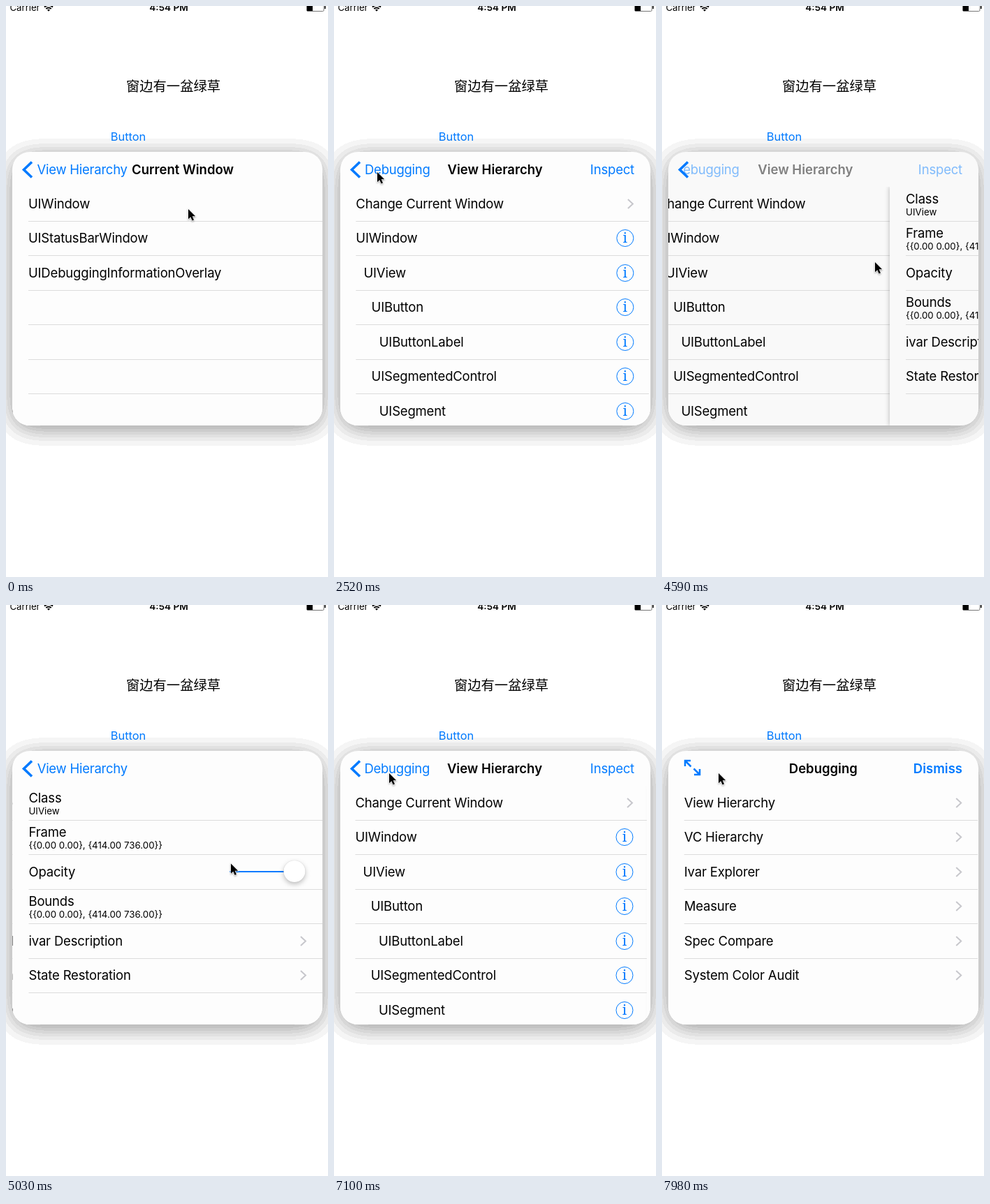
An HTML page for the animation above (8000 ms loop, 461x818 px).

```html
<!DOCTYPE html>
<html lang="en">
<head>
<meta charset="utf-8">
<title>Debug overlay</title>
<style>
  html, body { margin: 0; width: 100%; height: 100%; overflow: hidden; background: #fff; }
  body { position: relative; color: #000; font: 18.5px Inter, sans-serif; letter-spacing: -.18px; white-space: nowrap; }
  div, span, svg { position: absolute; }
  svg { overflow: visible; fill: none; stroke: #007aff; left: 0; top: 0; }
  .mid { transform: translate(-50%, -50%); line-height: 1; letter-spacing: 0; }
  .blue { color: #007aff; }
  #panel { left: 9px; top: 209px; width: 444px; height: 392px; }
  #shadow { inset: 5px 0 -5px; border-radius: 25px; background: #000; filter: url(#bands); }
  #view { inset: 0; border-radius: 25px; overflow: hidden; }
  .body { left: 0; top: 50px; width: 444px; height: 342px; background: inherit; clip-path: inset(0 0 0 -10px); }
  .nav { inset: 0 0 auto 0; height: 50px; line-height: 50px; }
  .clip { left: 22px; top: 0; width: 420px; height: 50px; overflow: hidden; }
  .back { left: 13.5px; letter-spacing: -.25px; }
  .title, b { font-weight: 600; letter-spacing: 0; }
  .right { right: 23px; }
  .row { left: 23px; right: 0; height: 49px; line-height: 49px; border-bottom: 1px solid #dcdcdc; }
  .row.last { border-color: transparent; }
  .row .head { top: -7.5px; }
  .row .sub { top: 12px; font-size: 13.3px; letter-spacing: 0; }
  .info { left: 373px; top: 12px; width: 25px; height: 25px; box-sizing: border-box; border: 1.3px solid #007aff;
    border-radius: 50%; color: #007aff; font: 500 20px/21px "Noto Serif", serif; text-align: center; letter-spacing: 0; }
  .track { left: 288px; top: 23px; width: 92px; height: 2px; background: #007aff; }
  .knob { left: 365px; top: 8px; width: 31px; height: 31px; border-radius: 50%; background: #fff;
    box-shadow: 0 3px 7px rgba(0,0,0,.25), 0 0 1px rgba(0,0,0,.2); }
</style>
</head>
<body>
  <svg width="0" height="0">
    <filter id="bands" x="-20%" y="-20%" width="140%" height="140%">
      <feGaussianBlur stdDeviation="18"/>
      <feComponentTransfer>
        <feFuncA type="discrete" tableValues="0 .04 .08 .12 .16 .2 .24 .28 .32 .36 .4 .44"/>
      </feComponentTransfer>
    </filter>
  </svg>

  <span class="mid" style="left:27px;top:3px;font-size:13.2px">Carrier</span>
  <span class="mid" style="left:233px;top:3px;font-size:13.6px;font-weight:600">4:54 PM</span>
  <svg width="461" height="20" style="stroke:#000">
    <path stroke-width="1.9" d="M55 1.5a8.5 8.5 0 0 1 12 0M57.3 4a5.2 5.2 0 0 1 7.4 0"/>
    <path d="M59 5.6a3 3 0 0 1 4 0l-2 2.2z" fill="#000" stroke="none"/>
    <rect x="430.5" y="-4.5" width="24.5" height="12" rx="1.5" stroke="#777"/>
    <path d="M431 -4h8v11h-8zM456 0h1.5v4h-1.5z" fill="#000" stroke="none"/>
  </svg>
  <span class="mid" style="left:239.5px;top:115px;font:19.3px/1 'Noto Sans CJK SC','Noto Sans CJK',sans-serif">窗边有一盆绿草</span>
  <span class="mid blue" style="left:175px;top:187px;font-size:16.4px">Button</span>

  <div id="panel">
    <div id="shadow"></div>
    <div id="view">
      <svg id="chevron" width="50" height="50"><path stroke-width="3.6" d="M28 14.5L16.5 25.5L28 36.5"/></svg>
    </div>
  </div>
  <svg id="cursor" width="16" height="22" style="filter:drop-shadow(0 1px 1px rgba(0,0,0,.35))">
    <path d="M0 0V14.2L3.3 11.2L5.6 16.6L8 15.6L5.7 10.3H10.2Z" fill="#000" stroke="#fff" stroke-width="1.2" paint-order="stroke"/>
  </svg>

<script>
const $ = id => document.getElementById(id);
const view = $('view'), chevron = $('chevron'), cursor = $('cursor');

const icon = (d, color, width) =>
  `<svg width="9" height="9"><path d="${d}" style="stroke:${color}" stroke-width="${width}"/></svg>`;
const arrow = icon('M389.5 18L396.5 24.5L389.5 31', '#c7c7cc', 2);
const info = '<span class="info">i</span>';
const check = icon('M382.5 24.5L387 29L396 19', '#007aff', 2.5);
const slider = '<div class="track"></div><div class="knob"></div>';
const expand = icon('M24 22V14H32M24 14L32.5 22.5M45 26V34H37M45 34L36.5 25.5', '#007aff', 2.5);

const text = (label, indent = 0) => `<span style="left:${indent * 11.15}px">${label}</span>`;
const detail = (label, sub) => `<span class="head">${label}</span><span class="sub">${sub}</span>`;
const rect = '{{0.00 0.00}, {414.00 736.00}}';

function makePage({ back = '', title = '', center = 222, right = '', rows, extra = '', openEnd }) {
  const body = document.createElement('div'), nav = document.createElement('div');
  body.className = 'body';
  body.innerHTML = rows.map((row, i) => {
    const last = openEnd && i === rows.length - 1 ? ' last' : '';
    return `<div class="row${last}" style="top:${Math.floor(i * 49.5)}px">${row}</div>`;
  }).join('');
  nav.className = 'nav';
  nav.innerHTML = `${extra}<div class="clip"><span class="back blue">${back}</span></div>
    <span class="title" style="left:${center}px">${title}</span><span class="right blue">${right}</span>`;
  view.append(body);
  return { body, nav, back: nav.querySelector('.back'), title: nav.querySelector('.title'),
    right: nav.querySelector('.right'), extra: nav.querySelector('svg') };
}

const menu = makePage({
  title: 'Debugging', right: '<b>Dismiss</b>', extra: expand, openEnd: true,
  rows: ['View Hierarchy', 'VC Hierarchy', 'Ivar Explorer', 'Measure', 'Spec Compare', 'System Color Audit']
    .map(label => text(label) + arrow)
});
const tree = makePage({
  back: 'Debugging', title: 'View Hierarchy', right: 'Inspect',
  rows: [text('Change Current Window') + arrow,
    ...[['UIWindow', 0], ['UIView', 1], ['UIButton', 2], ['UIButtonLabel', 3], ['UISegmentedControl', 2], ['UISegment', 3]]
      .map(([label, indent]) => text(label, indent) + info)]
});
const windows = makePage({
  back: 'View Hierarchy', title: 'Current Window', center: 244,
  rows: [text('UIWindow') + `<span id="check">${check}</span>`, text('UIStatusBarWindow'),
    text('UIDebuggingInformationOverlay'), '', '', '']
});
const object = makePage({
  back: 'View Hierarchy',
  rows: [detail('Class', 'UIView'), detail('Frame', rect), text('Opacity') + slider, detail('Bounds', rect),
    text('ivar Description') + arrow, text('State Restoration') + arrow]
});
const pages = [menu, tree, windows, object];
view.append(...pages.map(page => page.nav), chevron);

const LOOP = 8000, STEP = 148;
const moves = [
  { start: 2110, parent: tree, child: windows },
  { start: 4530, parent: tree, child: object, push: true },
  { start: 6750, parent: tree, child: object },
  { start: 7530, parent: menu, child: tree }
];
const presses = [[2040, 2110], [6600, 6750], [7390, 7530]];

// Pointer path: step, x, y
const path = [
  [0, 261, 291], [1, 258, 292], [2, 257, 293], [6, 257, 292], [8, 225, 287], [10, 132, 266], [11, 103, 257],
  [13, 76, 241], [17, 62, 238], [21, 55, 242], [23, 75, 255], [25, 200, 335], [27, 345, 400], [28, 395, 406],
  [29, 414, 389], [30, 400, 384], [31, 305, 367], [33, 300, 365], [37, 388, 387], [38, 380, 384], [40, 260, 328],
  [42, 124, 265], [44, 84, 245], [45, 78, 241], [48, 79, 241], [53, 83, 242], [54, 81, 241]
];

const clamp = v => Math.max(0, Math.min(1, v));

function spring(ms) {
  const w = ms * .01826;
  return ms < 0 ? 0 : 1 - (1 + w) * Math.exp(-w);
}

function pose(el, x, opacity) {
  el.style.transform = el.className === 'title' ? `translateX(calc(-50% + ${x}px))` : `translateX(${x}px)`;
  el.style.opacity = opacity;
}

// q is 0 with the parent on screen and 1 with the child on screen
function showPair(parent, child, q) {
  for (const page of pages) {
    const shown = page === parent || page === child;
    page.body.style.display = page.nav.style.display = shown ? '' : 'none';
  }
  const leaving = clamp(1 - 1.8 * q), arriving = clamp(2 * q - 1);
  pose(parent.body, -133 * q, 1);
  pose(parent.title, -90 * q, leaving);
  pose(parent.back, -96 * q, leaving);
  pose(parent.right, 0, leaving);
  if (parent.extra) parent.extra.style.opacity = leaving;
  pose(child.body, 444 * (1 - q), 1);
  pose(child.title, 180 * (1 - q), arriving);
  pose(child.back, 119 * (1 - q), arriving);
  pose(child.right, 0, arriving);
  const fade = Math.min(1 - q, 4 * q);
  parent.body.style.boxShadow = 'none';
  child.body.style.boxShadow = `-1px 0 6px rgba(0,0,0,${.3 * fade})`;
  view.style.background = q > .02 && q < .98 ? '#f9f9f9' : '#fdfdfd';
  chevron.style.opacity = parent === menu ? arriving : 1;
}

function draw(now) {
  const step = Math.floor((now % LOOP + 14) / STEP), t = step * STEP;
  const move = moves.filter(m => m.start <= t).pop();
  if (move) {
    const p = spring(t - move.start);
    showPair(move.parent, move.child, move.push ? p : 1 - p);
  } else showPair(tree, windows, 1);

  if (presses.some(([from, to]) => t >= from && t < to)) {
    chevron.style.opacity = .3;
    for (const page of [tree, windows, object]) page.back.style.opacity *= .3;
  }
  $('check').style.visibility = step >= 6 ? 'visible' : 'hidden';

  const i = Math.max(1, path.findIndex(([k]) => k >= step));
  const [k0, x0, y0] = path[i - 1], [k1, x1, y1] = path[i], f = (step - k0) / (k1 - k0);
  cursor.style.transform = `translate(${x0 + (x1 - x0) * f}px, ${y0 + (y1 - y0) * f}px)`;
  requestAnimationFrame(draw);
}
requestAnimationFrame(draw);
</script>
</body>
</html>
```
